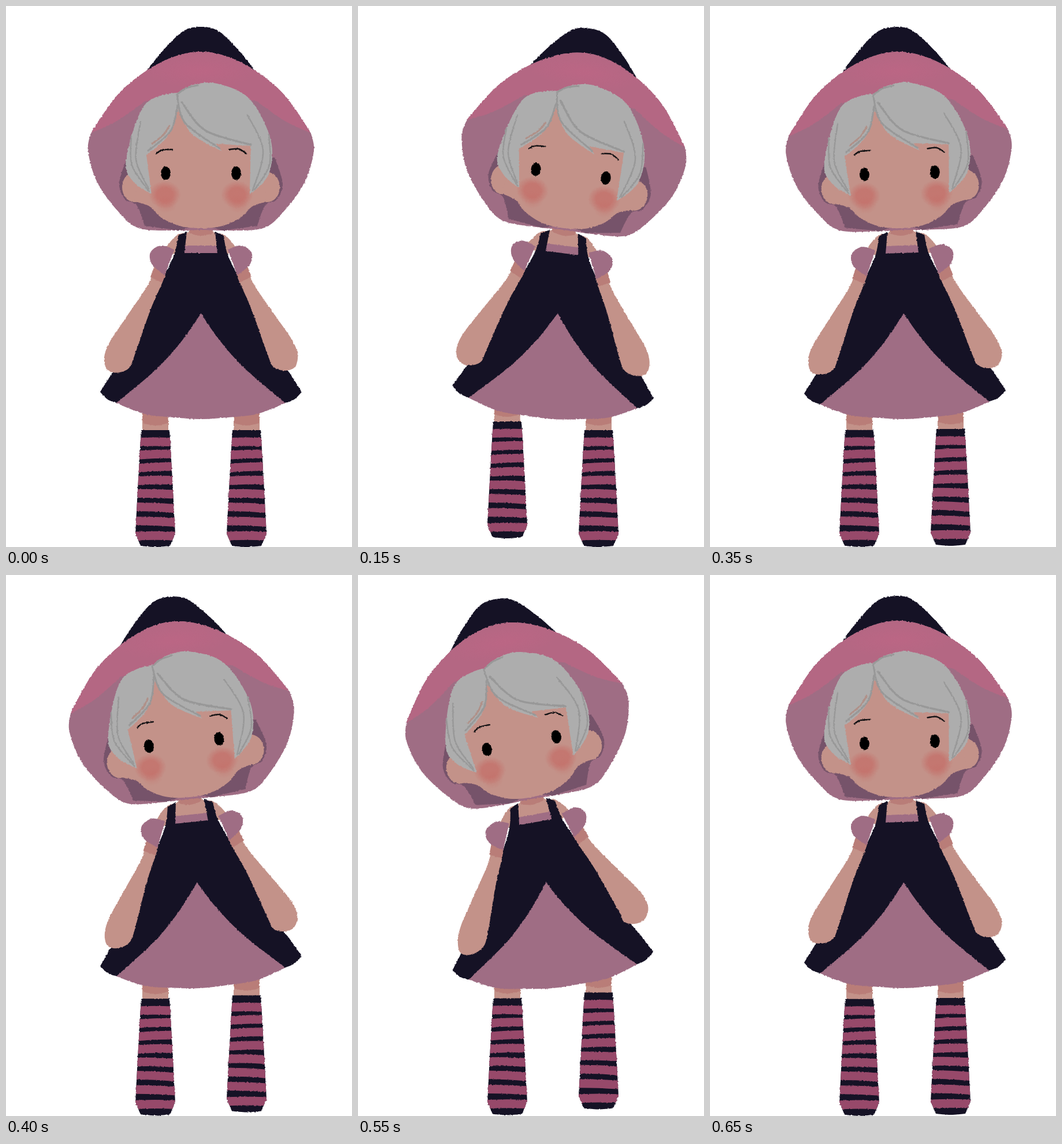
Animation of 599 by 935 pixels, one loop 0.7 s. Source, as an HTML page with a canvas:

```html
<!DOCTYPE html>
<html lang="en">
<head>
<meta charset="utf-8">
<title>Swaying doll</title>
<style>
html, body { margin: 0; width: 100%; height: 100%; overflow: hidden; background: #fff; }
canvas { display: block; filter: url(#rough); }
svg { position: absolute; width: 0; height: 0; }
</style>
</head>
<body>
<canvas id="stage" width="599" height="935"></canvas>
<svg><filter id="rough" x="0" y="0" width="1" height="1" color-interpolation-filters="sRGB">
  <feTurbulence type="fractalNoise" baseFrequency=".3" numOctaves="2" seed="4"/>
  <feColorMatrix values="1 0 0 0 0  0 1 0 0 0  0 0 1 0 0  0 0 0 0 1" result="noise"/>
  <feDisplacementMap in="SourceGraphic" in2="noise" scale="3" xChannelSelector="R" yChannelSelector="G"/>
</filter></svg>
<script>
const ctx = document.getElementById('stage').getContext('2d');
const LOOP = 700, STEP = 50, CX = 337.5, NECK = 383;
const NAVY = '#151225', PINK = '#b46783', MAUVE = '#9f6d84', SHADE = '#76536a';
const SKIN = '#c39289', BLUSH = '#b97d78', HAIR = '#adadad', STRAND = '#989898', SOCK = '#97496a';

const rad = deg => deg * Math.PI / 180;
const mix = (a, b, k) => a + (b - a) * Math.min(1, Math.max(0, k));
const same = p => p;
const flip = ([x, y, corner]) => [2 * CX - x, y, corner];

// "x,y" points; a trailing "!" marks a corner.
const path = text => text.split(' ').map(w => [...w.split(',').map(parseFloat), w.endsWith('!')]);

// Left half of a symmetric outline, completed by its mirror image.
function half(text) {
  const left = path(text);
  return [...left, ...left.filter(p => p[0] < CX).map(flip).reverse()];
}

function trace(points, map = same, closed = true) {
  const pts = points.map(p => map(p)), n = pts.length;
  const index = i => closed ? (i + n) % n : Math.min(n - 1, Math.max(0, i));
  const slope = (i, axis) => points[index(i)][2] ? 0
    : (pts[index(i + 1)][axis] - pts[index(i - 1)][axis]) / 6;
  ctx.beginPath();
  ctx.moveTo(pts[0][0], pts[0][1]);
  for (let i = 0; i < (closed ? n : n - 1); i++) {
    const [x, y] = pts[i], [u, v] = pts[index(i + 1)];
    ctx.bezierCurveTo(x + slope(i, 0), y + slope(i, 1), u - slope(i + 1, 0), v - slope(i + 1, 1), u, v);
  }
}
function shape(color, points, map) {
  trace(points, map);
  ctx.fillStyle = color;
  ctx.fill();
}
function line(color, width, text) {
  trace(path(text), same, false);
  ctx.strokeStyle = color;
  ctx.lineWidth = width;
  ctx.lineCap = 'round';
  ctx.stroke();
}
function oval(color, x, y, rx, ry) {
  ctx.beginPath();
  ctx.ellipse(x, y, rx, ry, 0, 0, 7);
  ctx.fillStyle = color;
  ctx.fill();
}
function glow(rgb, x, y, rx, ry, alpha, core) {
  ctx.save();
  ctx.translate(x, y);
  ctx.scale(rx, ry);
  const g = ctx.createRadialGradient(0, 0, core, 0, 0, 1);
  g.addColorStop(0, `rgba(${rgb},${alpha})`);
  g.addColorStop(1, `rgba(${rgb},0)`);
  oval(g, 0, 0, 1, 1);
  ctx.restore();
}

// Lean in degrees: a short swing right, then a deeper one left and back.
function lean(t) {
  if (t < 300) return 7.1 * Math.sin(Math.PI * t / 300);
  const x = 1 - Math.abs(t - 500) / 200;
  return -14 * x * (0.11 + 2 * x - 1.11 * x * x);
}
const chestShift = a => 2.5 * a - 0.04 * a * a;
const neckShift = a => 3.1 * a - 0.05 * a * a;

function turned([x, y], deg, dx) {
  const turn = rad(deg);
  return [CX + dx + (x - CX) * Math.cos(turn), y + (x - CX) * Math.sin(turn)];
}
// The torso bends: hips turn half as far as the shoulders.
const torsoBend = a => p => {
  const y = p[1], tip = Math.sin(rad(a / 2)) * 134;
  const dx = y > 531 ? mix(tip, 0, (y - 531) / 134)
    : y > 427 ? mix(chestShift(a), tip, (y - 427) / 104)
    : mix(neckShift(a), chestShift(a), (y - NECK) / 44);
  return turned(p, mix(a, a / 2, (y - 427) / 104), dx);
};
const armBend = a => p => {
  const k = (p[1] - 435) / 165;
  const hand = 0.75 * a - 0.02 * a * a - 0.7;
  const [x, y] = turned(p, mix(a, hand, k), mix(chestShift(a), 0, k));
  return [x, y - mix(0, Math.abs(a) * 0.25, k)];
};

function leg(side, lift) {
  ctx.save();
  ctx.translate(side * 79, -lift);
  shape(SKIN, half('315,690! 315,738!'));
  shape(BLUSH, half('315,690! 316,721! 337.5,725'));
  shape(NAVY, half('313,733! 309,800 303,912! 312,933! 337.5,935'));
  ctx.clip();
  for (let i = 0; i < 8; i++) {
    const y = 754 + 21.3 * i + 0.27 * i * i;
    line(SOCK, 15, `296,${y + 2 * Math.sin(i * 0.9)} 337,${y - 1} 380,${y - 2 * Math.sin(i * 0.9)}`);
  }
  ctx.restore();
}

function body(a) {
  const torso = torsoBend(a), arm = armBend(a);
  shape(SKIN, half('317,375! 316,390 298,395 284,408 272,425! 309,432!'), torso);
  shape(BLUSH, half('317,375! 318,393! 337.5,397'), torso);
  shape(MAUVE, half('306,414! 306,430!'), torso);
  shape(NAVY, half('309,427! 313,390! 298,397! 291,430 268,478 238,540 202,608 184,634! 163,667! 176,680 192,686! 337.5,700'), torso);
  shape(MAUVE, half('337.5,531! 305,578 260,628 191,686! 240,705 290,711 337.5,714'), torso);
  for (const side of [arm, p => arm(flip(p))]) {
    shape(SKIN, path('256,452! 246,481 206,540 179,580 170,606 175,626 192,632 212,625 222,604 250,525 271,477 277,460!'), side);
    shape(BLUSH, path('257,450! 250,468! 270,478! 277,460!'), side);
    shape(MAUVE, path('291,421! 268,414 250,426 253,447 275,465!'), side);
  }
}

function head(a) {
  ctx.save();
  ctx.translate(CX + neckShift(a), NECK);
  ctx.rotate(rad(a));
  ctx.translate(-CX, -NECK);

  shape(NAVY, half('244,112! 270,79 306,44 337.5,36'));
  shape(MAUVE, half('337.5,79 290,88 240,114 192,155 148,218! 142,250 158,305 195,356 230,384 290,388 337.5,387'));
  ctx.save();
  ctx.clip();
  shape(PINK, half('337.5,60! 120,60! 140,222! 190,200 240,165! 337.5,150'));
  glow('196,101,134', CX, 112, 100, 30, 0.4, 0.1);
  ctx.restore();
  shape(SHADE, half('210,262! 196,306 206,334 226,344 240,380! 300,388! 337.5,380'));

  for (const side of [-1, 1]) oval(SKIN, CX + side * 114.5, 313, 22, 26);
  shape(SKIN, half('265,165! 225,240 228,300 222,338! 248,346 268,365 300,380 337.5,384'));
  for (const side of [-1, 1]) {
    const x = CX + side * 62.5;
    glow('196,110,104', x, 326, 28, 24, 0.75, 0.5);
    glow('196,110,104', x + 2, 342, 19, 16, 0.3, 0.3);
  }

  shape(HAIR, path('297,150! 240,171 208,265 220,303 252,325! 243,257! 280,225 298,178! 322,221 374,251! 363,238! 424,242! 422,326! 455,290 458,230 421,160 365,134 325,136'));
  line(STRAND, 3, '297,152 312,142 332,137');
  line(STRAND, 3, '296,153 310,202 370,246');
  line(STRAND, 3.5, '304,166 345,215 424,240');
  line(STRAND, 3, '297,172 285,216 246,250');
  line('#b09088', 3, '283,207 272,223 253,238');
  line(STRAND, 2.5, '217,225 218,275 248,321');
  line(STRAND, 2.5, '233,200 225,265 247,316');
  line(STRAND, 2.5, '418,188 445,250 427,319');
  line(STRAND, 2.5, '455,222 456,275 430,318');

  line('#151315', 2.5, '260,255 270,249 288,248');
  line('#151315', 2.5, '387,248 403,247 416,255');
  for (const side of [-1, 1]) oval('#000', CX + side * 61, 289, 8.5, 11.5);
  ctx.restore();
}

function draw(time) {
  const a = lean(Math.floor(time % LOOP / STEP) * STEP);
  const right = Math.max(0, a), left = Math.max(0, -a);
  ctx.fillStyle = '#fff';
  ctx.fillRect(0, 0, 599, 935);
  leg(-1, right * 2.1 + left * 0.15);
  leg(1, left * 1.1);
  body(a);
  head(a);
}

const start = performance.now();
function tick() {
  draw(performance.now() - start);
  requestAnimationFrame(tick);
}
tick();
</script>
</body>
</html>
```
